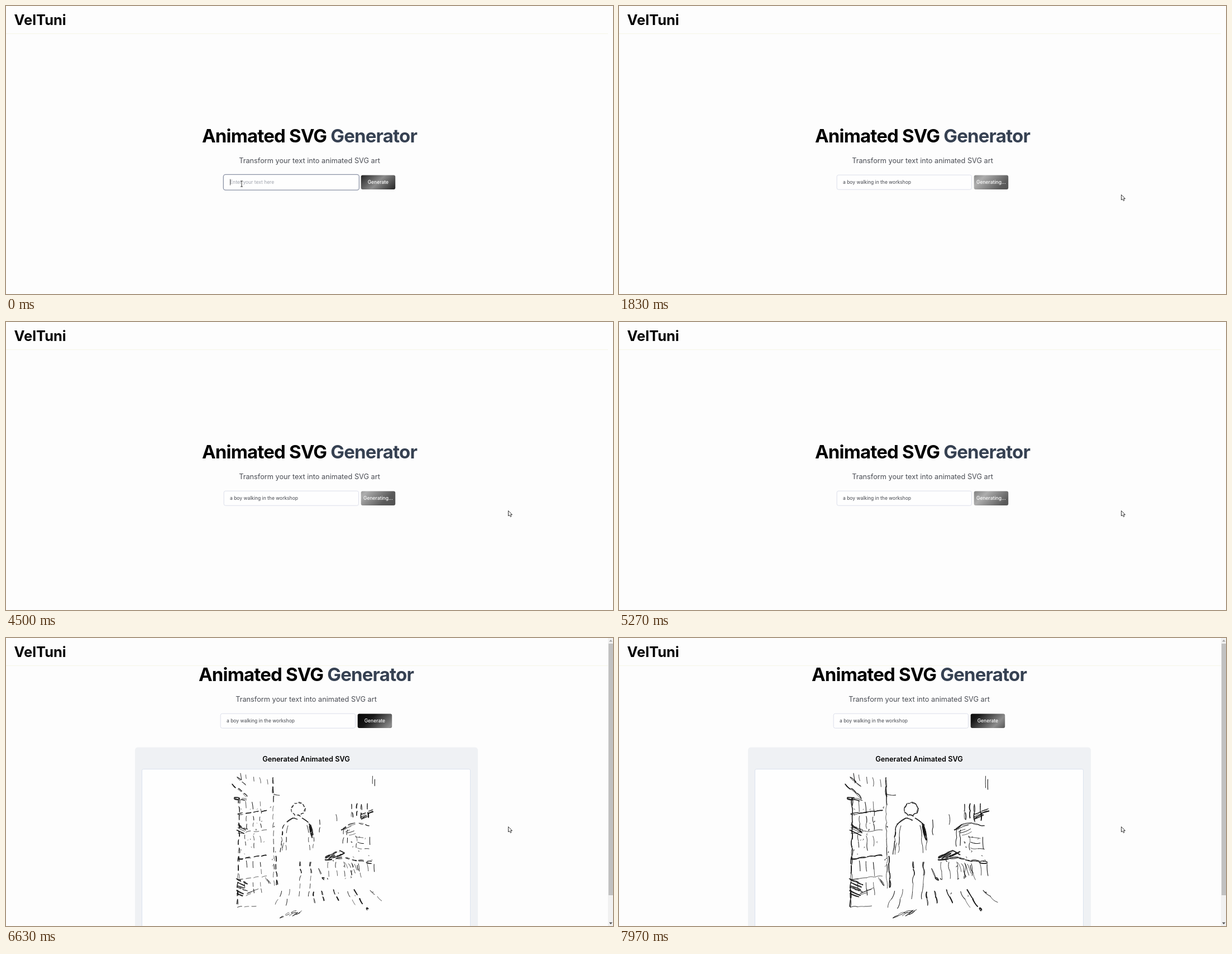
An HTML page with a canvas that plays this animation: 1087 px wide and 515 px high, repeating every 8 s.

```html
<!DOCTYPE html>
<html lang="en">
<head>
<meta charset="utf-8">
<title>Animated SVG Generator</title>
<style>
  html, body { margin: 0; width: 1087px; height: 515px; overflow: hidden; background: #fdfdfd; }
  svg, canvas { position: absolute; left: 0; top: 0; width: 1087px; height: 515px; display: block; }
  text { font-family: Inter, "Liberation Sans", sans-serif; }
  .mid { text-anchor: middle; }
  .small { font-size: 8.5px; }
  .medium { font-size: 12.74px; }
  .pointer { fill: #fff; stroke: #222; stroke-width: .9; stroke-linejoin: round; }
</style>
</head>
<body>
<svg viewBox="0 0 1087 515">
  <defs>
    <linearGradient id="sheen" gradientUnits="userSpaceOnUse" spreadMethod="reflect">
      <stop offset="0" stop-color="#000"/>
      <stop offset=".22" stop-color="#181818"/>
      <stop offset=".5" stop-color="#8c8c8c"/>
      <stop offset=".78" stop-color="#181818"/>
      <stop offset="1" stop-color="#000"/>
    </linearGradient>
  </defs>
  <g id="page">
    <text class="mid" x="543.5" y="244" font-size="33" font-weight="700" letter-spacing="-.025em">Animated SVG <tspan fill="#364152">Generator</tspan></text>
    <text class="mid medium" x="543.5" y="280.7" fill="#4b4e55">Transform your text into animated SVG art</text>
    <rect id="field" fill="#fefefe"/>
    <text id="entry" class="small" x="401" y="317.8"></text>
    <path id="caret" d="M401.5 309.5v11" stroke="#333" stroke-width=".8"/>
    <g id="button">
      <rect x="635.7" y="302.5" width="61.5" height="25.5" rx="3" fill="url(#sheen)"/>
      <text id="label" class="small mid" x="666.4" y="317.8" font-weight="500" fill="#fff"></text>
    </g>
  </g>
  <g id="result">
    <rect x="231" y="195.5" width="614" height="340" rx="5" fill="#eff1f4"/>
    <text class="mid medium" x="537.5" y="221.4" font-weight="600">Generated Animated SVG</text>
    <rect x="243.5" y="234.5" width="588" height="300" rx="2.5" fill="#fefefe" stroke="#d6deec" stroke-width=".8"/>
    <rect x="1078" width="9" height="515" fill="#f1f1f1"/>
    <rect x="1079" y="10" width="8" height="450" fill="#c1c1c1"/>
    <path d="M1080 6.5l3-3.5 3 3.5z" fill="#a3a3a3"/>
    <path d="M1080 508.5l3 3.5 3-3.5z" fill="#505050"/>
  </g>
  <path d="M0 49.5H1078" stroke="#f5f5e6"/>
  <text x="14.5" y="33.5" font-size="25.48" font-weight="700">VelTuni</text>
</svg>
<canvas id="sketch"></canvas>
<svg viewBox="0 0 1087 515">
  <path id="beam" class="pointer" d="M-2-5h4M0-5V5M-2 5h4"/>
  <path id="hand" class="pointer" d="M-2 1V-5q1-2 2 0v4l5 1v3l-1 4h-5l-4-5q0-2 3 0z"/>
  <path id="arrow" class="pointer" d="M-3-5V4.500l2-2L1 6l1.500-1L1 2h3z"/>
</svg>
<script>
const LOOP = 8000, PASTE = 240, CLICK = 1200, DONE = 5870;
const $ = id => document.getElementById(id);
const set = (el, attrs) => { for (const k in attrs) el.setAttribute(k, attrs[k]); };
const show = (el, on) => { el.style.display = on ? "" : "none"; };
const clamp = x => Math.min(1, Math.max(0, x));
const smooth = x => (x = clamp(x), x * x * (3 - 2 * x));

// Same curve as the CSS "ease" timing function
function ease(x) {
  let lo = 0, hi = 1, s;
  const bez = (a, b) => 3 * (1 - s) * s * ((1 - s) * a + s * b) + s * s * s;
  for (let i = 0; i < 20; i++) {
    s = (lo + hi) / 2;
    if (bez(0.25, 0.25) < x) lo = s; else hi = s;
  }
  return bez(0.1, 1);
}

let seed = 41;
const rnd = () => (seed = (seed * 16807) % 2147483647) / 2147483647;
const jit = r => (rnd() * 2 - 1) * r;

/* ---- sketch: every line is broken into short marks that grow together ---- */
const marks = [];

function line(weight, ...pts) {
  for (let i = 0; i + 3 < pts.length; i += 2) {
    const [x0, y0, x1, y1] = pts.slice(i, i + 4);
    const dx = x1 - x0, dy = y1 - y0;
    const n = Math.max(1, Math.round(Math.hypot(dx, dy) / 15));
    for (let pass = 0; pass < weight; pass++) {
      const off = pass ? 1.4 : 0.4;
      const at = u => [x0 + dx * u + jit(off), y0 + dy * u + jit(off)];
      for (let k = 0; k < n; k++) {
        marks.push({ a: at(k / n), b: at((k + 1) / n), bend: jit(1.6), w: 0.65 + rnd() * 0.55 * weight });
      }
    }
  }
}

function hatch(x, y, dx, dy, n, sx, sy, weight = 1) {
  for (let i = 0; i < n; i++) {
    const px = x + i * sx + jit(1.5), py = y + i * sy + jit(1.5), k = 0.7 + rnd() * 0.5;
    line(weight, px, py, px + dx * k, py + dy * k);
  }
}

function drawShelf() {
  hatch(407, 262, 24, 21, 2, 5, -13, 2);
  hatch(419, 241, 2, 16, 5, 12, 3);
  hatch(408, 284, 28, 5, 2, 2, 3, 2);
  line(2, 478, 249, 479, 300);
  line(1, 479, 300, 480, 448);
  line(1, 479, 279, 496, 281);
  line(2, 417, 286, 417, 390, 414, 482);
  line(2, 483, 390, 485, 446);
  const boards = [286, 313, 347, 393, 430];
  boards.forEach((y, i) => {
    if (i) line(i % 2 + 1, 415, y + 2, 472, y - 4);
    hatch(429, y + 6, 2, 25, 3, 13, 0);
  });
  hatch(415, 335, 18, 9, 3, 0, 5, 2);
  hatch(414, 432, 20, 8, 6, 0, 5, 2);
  hatch(430, 462, 20, -8, 3, 1, -3);
  hatch(464, 428, 6, 11, 4, 2, 2);
  line(1, 414, 482, 453, 479);
}

function drawBoy() {
  const head = [];
  for (let a = -0.8; a < 5.6; a += 0.7) head.push(523 + 12.5 * Math.cos(a), 306 + 12.5 * Math.sin(a));
  line(1.3, ...head);
  line(2, 515, 321, 525, 327);
  for (const s of [-1, 1]) {
    const x = d => 522 + s * d;
    line(2, x(8), 322, x(24), 334, x(29), 356);
    line(1, x(29), 356, x(28), 380);
    line(1, x(17), 335, x(20), 356, x(22), 384);
  }
  hatch(542, 333, 7, 20, 4, 1, 3, 2);
  hatch(495, 362, -3, 22, 2, 1, 5);
  for (const x of [527, 545]) {
    line(2, x, 400, x + 1, 425);
    line(1, x + 1, 425, x - 3, 467);
  }
  line(2, 490, 501, 511, 491, 525, 488);
  hatch(508, 498, 12, -9, 5, 4, -1);
}

function drawBench() {
  hatch(562, 324, 1, 24, 2, 30, -9);
  hatch(656, 246, 0, 25, 2, 5, 6);
  hatch(619, 296, 1, 27, 4, 9, 0, 2);
  hatch(636, 325, 24, -10, 3, 0, -4, 2);
  line(2, 601, 344, 613, 334, 632, 331, 655, 336);
  hatch(604, 340, -1, 33, 2, 8, 2);
  hatch(604, 343, 18, -7, 4, 3, 3);
  hatch(627, 357, 24, 2, 3, 1, 9);
  hatch(628, 356, 1, 20, 2, 22, 0);
  line(2, 571, 393, 597, 380, 611, 388);
  line(3, 572, 397, 608, 393);
  line(2, 608, 393, 632, 399, 660, 401);
  hatch(573, 395, 14, -8, 6, 5, -1, 2);
  hatch(576, 399, 2, 28, 7, 14, 1);
  hatch(606, 402, 8, 22, 5, 6, 1);
  line(2, 560, 412, 566, 428, 573, 433);
  line(3, 645, 483, 649, 487);
}

function drawFloor() {
  for (const x of [508, 494, 551, 565, 587, 612, 623, 652]) {
    line(1 + x % 2, x, 450 + jit(4), x + (x - 545) * 0.25, 478 + jit(6));
  }
  for (let i = 0; i < 45; i++) {
    const x = i % 2 ? 415 + rnd() * 68 : 560 + rnd() * 98;
    const y = (i % 2 ? 290 : 350) + rnd() * 120;
    line(1, x, y, x + jit(2), y + 1 + rnd() * 2);
  }
}

[drawShelf, drawBoy, drawBench, drawFloor].forEach(draw => draw());

const canvas = $("sketch"), dpr = window.devicePixelRatio || 1;
canvas.width = 1087 * dpr;
canvas.height = 515 * dpr;
const ctx = canvas.getContext("2d");
ctx.scale(dpr, dpr);
ctx.strokeStyle = "#181818";

function drawSketch(p) {
  ctx.clearRect(0, 0, 1087, 515);
  if (p <= 0) return;
  for (const { a, b, bend, w } of marks) {
    const dx = b[0] - a[0], dy = b[1] - a[1], len = Math.hypot(dx, dy) || 1;
    ctx.lineWidth = w * Math.min(1, 0.3 + p);
    ctx.beginPath();
    ctx.moveTo(...a);
    for (let i = 1; i <= 4; i++) {
      const u = p * i / 4, s = bend * 4 * u * (1 - u) / len;
      ctx.lineTo(a[0] + dx * u - dy * s, a[1] + dy * u + dx * s);
    }
    ctx.stroke();
  }
}

/* ---- interface ---- */
// Time and position of the button's moving highlight
const sheenKeys = [[0, 0.5], [1070, 1.08], [2930, 0.5], [4500, 1.02], [6030, 0.55], [6630, -0.1], [LOOP, 0.15]];

function sheenAt(t) {
  const i = sheenKeys.findIndex(k => k[0] > t);
  const [t0, a] = sheenKeys[i - 1], [t1, b] = sheenKeys[i];
  return a + (b - a) * smooth((t - t0) / (t1 - t0));
}

function drawPointer(t) {
  const go = smooth((t - 330) / 470), leave = smooth((t - 1270) / 380);
  const x = 422 + 257 * go + 223.5 * leave;
  const y = 318 + 12.5 * go + 12 * leave;
  const kind = x < 632 ? "beam" : x < 697 ? "hand" : "arrow";
  for (const id of ["beam", "hand", "arrow"]) {
    show($(id), id === kind);
    set($(id), { transform: `translate(${x} ${y})` });
  }
}

function drawPage(t) {
  const pasted = t >= PASTE, focus = t < CLICK, done = t >= DONE;
  const busy = !focus && !done, grow = focus ? 0.9 : 0;
  set($("page"), { transform: done ? "translate(-6 -167)" : "" });
  show($("result"), done);
  set($("field"), {
    x: 390.2 - grow, y: 302.2 - grow, width: 241.3 + 2 * grow, height: 26 + 2 * grow, rx: 3 + grow,
    stroke: focus ? "#8b92a5" : "#d5d8e6", "stroke-width": focus ? 1.3 : 0.8
  });
  $("entry").textContent = pasted ? "a boy walking in the workshop" : "Enter your text here";
  set($("entry"), { fill: pasted ? "#44474e" : "#a0a4ad" });
  show($("caret"), t < 530);
  set($("caret"), { transform: pasted ? "translate(123 0)" : "" });
  $("label").textContent = busy ? "Generating..." : "Generate";
  set($("button"), { opacity: busy ? 0.7 : 1 });
  const cx = 697 - 61.5 * sheenAt(t), cy = 315.2, r = 43;
  set($("sheen"), { x1: cx - r, y1: cy - r, x2: cx + r, y2: cy + r });
}

const start = performance.now();
function frame(now) {
  const t = Math.max(0, now - start) % LOOP;
  drawPage(t);
  drawPointer(t);
  drawSketch(t < DONE ? 0 : ease(clamp((t - DONE) / 2000)));
  requestAnimationFrame(frame);
}
frame(start);
</script>
</body>
</html>
```
